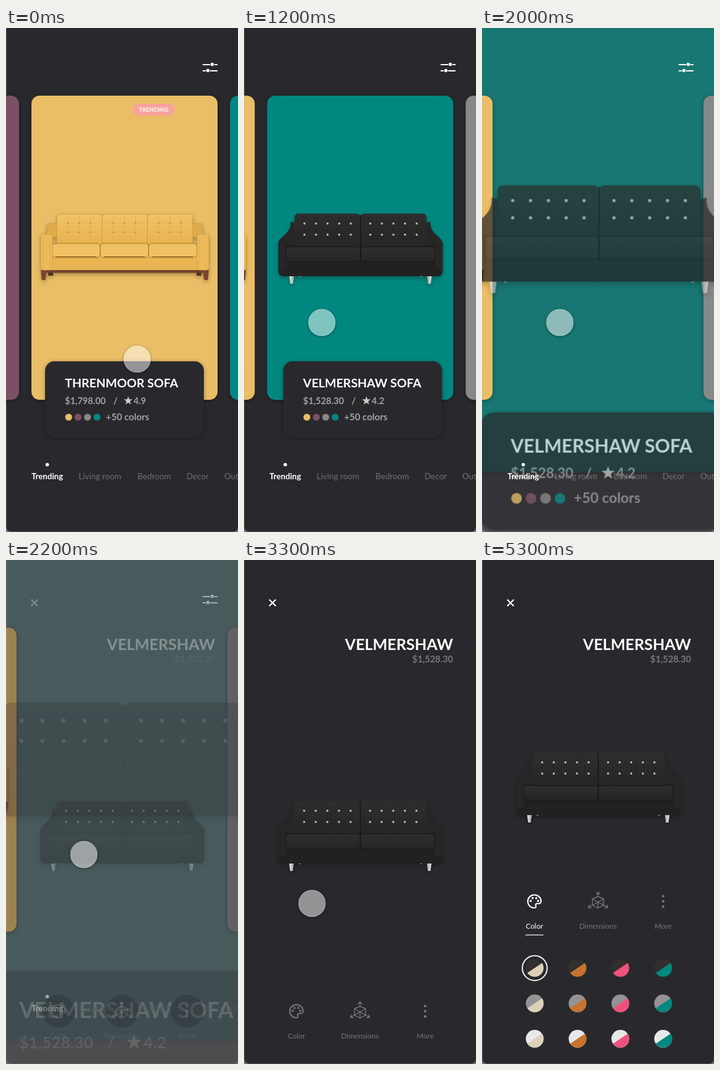
An HTML page for the animation above (5.4 s loop, 374 by 812 pixels).

```html
<!DOCTYPE html>
<html lang="en">
<head>
<meta charset="utf-8">
<title>Sofa shop</title>
<style>
  html, body { margin: 0; width: 100%; height: 100%; overflow: hidden; background: #6d6d70; }
  #stage { position: absolute; left: 0; top: 0; width: 374px; height: 812px; overflow: hidden; }
  svg { display: block; font-family: Lato, sans-serif; }
  .card { filter: drop-shadow(0 1px 3px rgba(0, 0, 0, .35)); }
  .sofa { filter: drop-shadow(0 3px 3px rgba(0, 0, 0, .28)); }
  #cursor {
    position: absolute; left: -22px; top: -22px; width: 44px; height: 44px; border-radius: 50%;
    box-sizing: border-box; background: rgba(255, 255, 255, .5);
    border: 1px solid rgba(255, 255, 255, .18); box-shadow: 0 1px 4px rgba(0, 0, 0, .4);
  }
</style>
</head>
<body>
<div id="stage">
  <svg id="art" width="374" height="812" viewBox="0 0 374 812"></svg>
  <div id="cursor"></div>
</div>
<script>
const LOOP = 5400, STEP = 100;
const DARK = '#29292d', GOLD = '#eabe66', PLUM = '#7b5064', GREY = '#888888', TEAL = '#008880';

// ---------- drawing helpers ----------
const text = (x, y, str, size, fill, weight = 400, extra = '') =>
  `<text x="${x}" y="${y}" font-size="${size}" fill="${fill}" font-weight="${weight}" ${extra}>${str}</text>`;
const rect = (x, y, w, h, r, fill, extra = '') =>
  `<rect x="${x}" y="${y}" width="${w}" height="${h}" rx="${r}" fill="${fill}" ${extra}/>`;
const dot = (x, y, r, fill, extra = '') =>
  `<circle cx="${x}" cy="${y}" r="${r}" fill="${fill}" ${extra}/>`;
const path = (d, fill, extra = '') => `<path d="${d}" fill="${fill}" ${extra}/>`;
const line = (d, stroke, width) => path(d, 'none', `stroke="${stroke}" stroke-width="${width}"`);
const group = (x, y, body, extra = '') => `<g transform="translate(${x} ${y})" ${extra}>${body}</g>`;
const mirror = (width, body) => body + `<g transform="translate(${width} 0) scale(-1 1)">${body}</g>`;
const repeat = (n, fn) => Array.from({ length: n }, (_, i) => fn(i)).join('');
const each = (list, fn) => list.map(fn).join('');

const star = (x, y, r) => {
  const points = Array.from({ length: 10 }, (_, i) => {
    const a = i * Math.PI / 5, d = i % 2 ? r * .4 : r;
    return `${(x + d * Math.sin(a)).toFixed(2)},${(y - d * Math.cos(a)).toFixed(2)}`;
  });
  return `<polygon points="${points.join(' ')}" fill="#cfccbf"/>`;
};

// ---------- sofas ----------
function blackSofa() {
  const half = path('M17 95h9l-2.4 18h-4.2z', 'url(#steel)') + rect(33, 97, 3, 5, 0, '#a5a5a5') +
    path('M20 13C22 32 3 36 0 47V92Q0 101 9 101H133V50H27V15Z', '#212122') +
    path('M20 13C22 32 3 36 0 47V90H12V50H27V15Z', '#262627') +
    rect(26, 0, 106.5, 57, 6, 'url(#coal)') +
    repeat(5, i => {
      const x = 42 + i * 18.7;
      return line(`M${x} 4V52`, '#262627', .8) + dot(x, 16, 1.7, '#c4c4c4') + dot(x, 34, 1.7, '#c4c4c4');
    }) +
    rect(12.5, 53.5, 120, 24, 4, 'url(#coal)', 'stroke="#18181a"');
  return `<g class="sofa">${mirror(265, half)}${line('M132.5 2V78', '#151516', 1.4)}</g>`;
}

function goldSofa() {
  const edge = 'stroke="#cf9a3d" stroke-width=".8"';
  const feet = rect(12, 95, 8, 5, 1, '#54301f') + path('M0 91H10L7.5 107H1.5Z', '#7d4530');
  const wing = rect(10, 16, 17, 22, 3, '#dfaa4a', edge);
  const arm = rect(0, 33, 19, 58, 4, '#ecbb59', edge) + line('M4 38V89M15 38V89', '#dda94a', .7);
  const back = i => group(26 + i * 73, 1, rect(0, 0, 73, 50, 4, 'url(#honey)', edge) +
    line('M5 14H68M5 29H68M18 3V43M36 3V43M54 3V43', '#dfae52', .7) +
    repeat(6, n => dot(18 + n % 3 * 18, n < 3 ? 14 : 29, 1.3, '#c08c34')));
  const seat = i => group(18 + i * 78, 48, rect(0, 0, 78, 23, 6, '#efc163', 'stroke="#a87625"') +
    line('M6 21.5H72', '#7d5417', 1.2));
  return `<g class="sofa">${rect(2, 91, 267, 4.5, 0, '#74402d')}${mirror(271, feet + wing)}${repeat(3, back)}
    ${rect(17, 66, 237, 25, 0, '#e8b552')}${repeat(3, seat)}${mirror(271, arm)}</g>`;
}

// ---------- list screen ----------
const card = fill => rect(0, 0, 300, 490, 13, fill, 'class="card"');

const info = (x, title, price, rate) => group(x, 428,
  rect(0, 0, 256, 123, 15, DARK, 'class="card"') +
  text(32, 42, title, 19.5, '#fff', 700) +
  text(32, 69, price, 14.5, '#a2a2a4', 700) +
  text(110, 69, '/', 15, '#a2a2a4', 700) +
  star(134, 63.5, 7.3) + text(142.5, 69, rate, 14.5, '#a2a2a4', 700) +
  each([GOLD, PLUM, GREY, TEAL], (c, i) => dot(38 + i * 15.2, 90, 5.6, c)) +
  text(98, 95, '+50 colors', 15, '#a2a2a4', 700));

const pill = rect(163, 13, 68, 19, 9.5, '#f8a29b') +
  text(197, 26, 'TRENDING', 9, '#fff', 700, 'text-anchor="middle" letter-spacing=".2"');

const nav = dot(66.5, 703.5, 2.8, '#fff') + text(41, 727, 'Trending', 13.2, '#fff', 700) +
  each([[117, 'Living room'], [212, 'Bedroom'], [291, 'Decor'], [352, 'Outdoor']],
    ([x, label]) => text(x, 727, label, 13.4, '#707073'));

const filterIcon = line('M317 59H329M336 59H341M317 69H322M329 69H341', '#fff', 2) +
  dot(332.5, 58.5, 2.7, '#fff') + dot(325.5, 68.5, 2.7, '#fff');

// The opened card lies below its neighbours, its content above them.
const listScreen = `<g id="list">
  <rect id="veil" width="374" height="812" fill="#7e797b"/>
  <g id="track">
    <g id="back">${card(TEAL)}</g>
    ${group(-279, 109, card(PLUM))}
    ${group(41, 109, card(GOLD) + pill + group(15, 190, goldSofa()) + info(22, 'THRENMOOR SOFA', '$1,798.00', '4.9'))}
    ${group(681, 109, card(GREY))}
    <g id="front">${group(18, 190, blackSofa())}${info(26, 'VELMERSHAW SOFA', '$1,528.30', '4.2')}</g>
  </g>${nav}${filterIcon}</g>`;

// ---------- detail screen ----------
const palette = line('M0-10.5C-6-10.5-10.7-6-10.7 0S-6 10.5 0 10.5C2 10.5 3 9 2.3 7.4C1.2 5 2.5 3.6 4.5 3.6H7C9.3 3.6 10.7 2 10.7-.5C10.7-6 6-10.5 0-10.5Z', 'currentColor', 2) +
  mirror(0, dot(-6, -.8, 1.8, 'currentColor') + dot(-3, -5.2, 1.8, 'currentColor'));
const cube = line('M0-8V-15M-3-11.5L0-15L3-11.5M0 1V11', 'currentColor', 1.4) +
  mirror(0, line('M0-8L9-4V6L0 11M9-4L0 1L15 9.5M14 5.5L15.5 10L10.5 10.5', 'currentColor', 1.4));
const more = repeat(3, i => dot(0, (i - 1) * 8.4, 2.1, 'currentColor'));

const tab = (x, icon, label) => group(x, 727,
  dot(0, 0, 26.5, DARK) + icon + text(0, 44, label, 11.8, 'currentColor', 400, 'text-anchor="middle"'),
  `id="${label}" color="#77777a"`);

const swatches = each(['#322f2e', '#949294', '#e8e8e8'], (top, row) =>
  each(['#dcd1b8', '#c87330', '#ee527c', TEAL], (low, col) => group(85 + col * 69, 657.3 + row * 57,
    dot(0, 0, 14.3, top) + path('M-14.3 0A14.3 14.3 0 0 0 14.3 0Z', low, 'transform="rotate(-34)"'))));

const detailScreen = `<g id="detail">
  ${line('M40.7 63.7L51.3 74.3M51.3 63.7L40.7 74.3', '#fff', 2)}
  ${text(337, 145, 'VELMERSHAW', 25, '#fff', 700, 'text-anchor="end"')}
  ${text(337, 165, '$1,528.30', 14.5, '#77777a', 700, 'text-anchor="end"')}
  <g id="sofa">${group(55, 388, blackSofa())}</g>
  <g id="tabs">${tab(84.5, palette, 'Color')}${tab(187, cube, 'Dimensions')}${tab(292, more, 'More')}
    <rect id="mark" x="70" y="780.5" width="29" height="1.2" fill="#fff"/></g>
  <g id="swatches">${swatches}${dot(85, 657.5, 20, 'none', 'stroke="#f2f2f2" stroke-width="2"')}</g></g>`;

const ramp = (id, a, b, across) =>
  `<linearGradient id="${id}" ${across ? '' : 'x2="0" y2="1"'}><stop stop-color="${a}"/><stop offset="1" stop-color="${b}"/></linearGradient>`;

const $ = id => document.getElementById(id);
$('art').innerHTML = `<defs>${ramp('coal', '#2e2e2f', '#252526')}${ramp('honey', '#f0c468', '#e6b24e')}
  ${ramp('steel', '#f0f0f0', '#9a9a9a', true)}</defs>
  ${path('M.7 0H374V803Q374 811.5 365.5 811.5H9.2Q.7 811.5 .7 803Z', DARK)}${listScreen}${detailScreen}`;

// ---------- motion ----------
const linear = p => p;
const easeOut = p => 1 - (1 - p) ** 2;
const easeInOut = p => p < .5 ? 2 * p * p : 1 - 2 * (1 - p) ** 2;
const ramped = (t, from, to, ease = easeInOut) => ease(Math.min(1, Math.max(0, (t - from) / (to - from))));
const style = (id, props) => Object.assign($(id).style, props);
const shift = (x, y) => `translate(${x}px, ${y}px)`;

// Cursor legs: swipe, settle, reach the colour tab, leave at the top.
const HOME = [211.5, 533.5];
const LEGS = [
  { from: 600, to: 800, at: [51.5, 508.5] },
  { from: 800, to: 1200, at: [125.5, 474.5] },
  { from: 3100, to: 3600, at: [76, 720.5] },
  { from: 4100, to: 4600, at: [290, -40] }
];
const cursorAt = t => LEGS.reduce((pos, { from, to, at }) => {
  const k = ramped(t, from, to);
  return pos.map((v, i) => v + (at[i] - v) * k);
}, HOME);

function render(t) {
  style('track', { transform: shift(-324 * ramped(t, 600, 1220, easeOut), 0) });

  const zoom = ramped(t, 1715, 2200);
  const opened = {
    transform: `${shift(361 - 121 * zoom, 109 - 224 * zoom)} scale(${1 + .815 * zoom})`,
    opacity: 1 - ramped(t, 1715, 2460)
  };
  style('back', opened);
  style('front', opened);
  style('veil', { opacity: ramped(t, 1800, 2200) });
  style('list', { opacity: 1 - ramped(t, 2000, 2500, linear) });
  style('detail', { opacity: ramped(t, 2050, 2500, linear) });

  const open = ramped(t, 3600, 4000);
  style('sofa', { transform: shift(0, -78 * open) });
  style('tabs', { transform: shift(0, -177 * open) });
  style('mark', { opacity: open });
  style('swatches', { opacity: open });
  const tone = Math.round(119 + 136 * open);
  style('Color', { color: `rgb(${tone}, ${tone}, ${tone})` });

  style('cursor', { transform: shift(...cursorAt(t)) });
}

const start = performance.now();
function tick() {
  const t = (performance.now() - start + 20) % LOOP;
  render(Math.floor(t / STEP) * STEP);
  requestAnimationFrame(tick);
}
tick();
</script>
</body>
</html>
```
